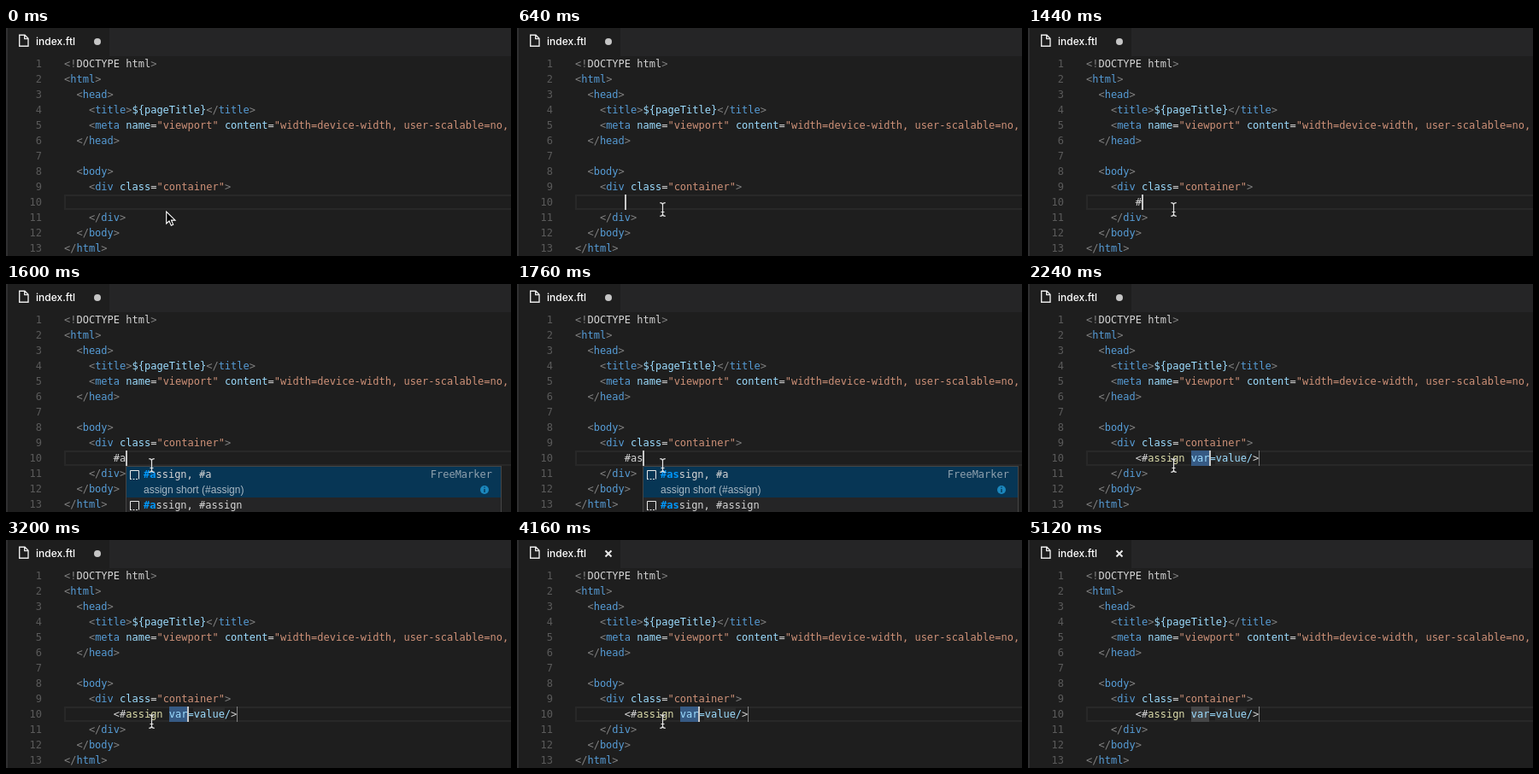
An HTML page for the animation above (5.28 s loop, 591 by 267 pixels).

```html
<!DOCTYPE html>
<html lang="en">
<head>
<meta charset="utf-8">
<title>Snippet completion</title>
<style>
html, body { margin: 0; width: 100%; height: 100%; overflow: hidden; background: #1e1e1e; }
svg { display: block; }
text { font: 12px "DejaVu Sans Mono", monospace; fill: #d4d4d4; white-space: pre; }
.num { fill: #5a5a5a; text-anchor: end; }
.punct { fill: #808080; }
.tag { fill: #569cd6; }
.attr { fill: #9cdcfe; }
.str { fill: #ce9178; }
.func { fill: #dcdcaa; }
.hit { fill: #0097fb; font-weight: bold; }
.tab { font: 500 12px Inter, sans-serif; fill: #fff; }
.note { font: 12px "Liberation Sans", Arial, sans-serif; fill: #a9b9c4; }
.origin { fill: #8fa1ae; text-anchor: end; }
.line { fill: none; stroke: #e8e8e8; }
</style>
</head>
<body>
<svg width="591" height="267" viewBox="0 0 591 267">
  <rect width="591" height="267" fill="#1e1e1e"/>
  <rect x="121" width="470" height="33" fill="#252526"/>
  <rect width="2" height="267" fill="#303031"/>
  <path class="line" stroke-width="1.4" d="M15.7 8.2H22L26 12.3V21.3H15.7ZM21.7 8.5V12.6H25.7"/>
  <text class="tab" x="35" y="20">index.ftl</text>
  <circle id="dirty" cx="107" cy="16" r="4" fill="#c5c5c5"/>
  <path id="close" class="line" stroke-width="2" d="M103.5 12.5l7 7m0-7l-7 7"/>

  <rect x="69" y="196" width="530" height="16" fill="none" stroke="#282828" stroke-width="2"/>
  <g id="fields">
    <rect id="selected" x="191" y="195" width="21" height="18"/>
    <rect x="219" y="195" width="37" height="18" fill="#2a2a2a"/>
    <rect x="270" y="195" width="1" height="18" fill="#808080"/>
  </g>
  <g id="code"></g>
  <text id="typed" x="125.8" y="208"></text>
  <rect id="caret" y="195" width="2" height="18" fill="#c8c8c8"/>

  <g id="widget">
    <rect x=".5" y="213.5" width="439" height="60" fill="#252526" stroke="#454545"/>
    <rect x="1" y="214" width="438" height="36" fill="#073655"/>
    <g id="rows"></g>
    <text class="origin" x="429" y="227">FreeMarker</text>
    <text class="note" x="21" y="245">assign short (#assign)</text>
    <circle cx="420" cy="241" r="5" fill="#1b87bd"/>
    <path d="M420 240v4M420 237.5v1.3" stroke="#073655" stroke-width="1.4"/>
  </g>

  <path id="arrow" d="M.7 1V15L4 12L6.3 17.3L8.7 16.2L6.4 11.1H11Z" fill="#000" stroke="#fff" stroke-width="1.1"/>
  <path id="beam" class="line" stroke-width="1.2" d="M.3 .7Q3.5 .7 3.5 3V14Q3.5 16.3 .3 16.3M6.7 .7Q3.5 .7 3.5 3M3.5 14Q3.5 16.3 6.7 16.3M1.5 11.5H5.5"/>
</svg>
<script>
const CHAR = 7.224, LOOP = 5280;
const $ = id => document.getElementById(id);
const esc = s => s.replace(/</g, '&lt;').replace(/>/g, '&gt;');
const span = (cls, s) => `<tspan class="${cls}">${esc(s)}</tspan>`;
const tag = (name, attrs = '') => span('punct', '<') + span('tag', name) + attrs + span('punct', '>');
const end = name => span('punct', '</') + span('tag', name) + span('punct', '>');
const attr = (name, value) => ' ' + span('attr', name) + '=' + span('str', `"${value}"`);

// Each line: indent in characters, content
const lines = [
  [0, span('punct', '<!') + 'DOCTYPE html' + span('punct', '>')],
  [0, tag('html')],
  [2, tag('head')],
  [4, tag('title') + span('attr', '${pageTitle}') + end('title')],
  [4, tag('meta', attr('name', 'viewport') + attr('content', 'width=device-width, user-scalable=no, '))],
  [2, end('head')],
  [0, ''],
  [2, tag('body')],
  [4, tag('div', attr('class', 'container'))],
  [0, ''],
  [4, end('div')],
  [2, end('body')],
  [0, end('html')]
];
$('code').innerHTML = lines.map(([indent, content], i) => {
  const y = 46 + 18 * i;
  return `<text class="num" x="42" y="${y}">${i + 1}</text>` +
    `<text x="${68 + indent * CHAR}" y="${y}">${content}</text>`;
}).join('');

const snippet = '&lt;#' + span('func', 'assign') + ' ' + span('attr', 'var=value/') + '&gt;';

const row = (y, word, rest, hits) =>
  `<path class="line" d="M5.5 ${y + 14}V${y + 4.5}H15.5V${y + 14}"/>` +
  `<path class="line" stroke-dasharray="2 1.5" d="M5 ${y + 14.5}H16"/>` +
  `<text x="21" y="${y + 13}">${span('hit', word.slice(0, hits))}${word.slice(hits)}${rest}</text>`;

// Value of the last step whose time has come
const at = (t, steps) => steps.filter(s => s[0] <= t).pop().slice(1);
const show = (id, on) => $(id).style.display = on ? '' : 'none';
const move = (id, x, y) => $(id).setAttribute('transform', `translate(${x} ${y})`);

const pointerSteps = [
  [0, 'arrow', 187, 214], [160, 'arrow', 139, 208], [320, 'arrow', 130, 200],
  [480, 'beam', 126, 194], [640, 'beam', 167, 204], [4640, 'beam', 321, 252], [4800, '']
];
const typedSteps = [[0, 0], [1440, 1], [1600, 2], [1760, 3], [1920, 5]];
const matchSteps = [[0, 2], [1760, 3], [1920, 4], [2080, 5]];
const caretSteps = [
  [0, false], [480, true], [960, false], [1440, true], [2720, false],
  [3200, true], [3680, false], [4160, true], [4640, false]
];

function draw(t) {
  const inserted = t >= 2240, saved = t >= 3680;
  const [count] = at(t, typedSteps), [hits] = at(t, matchSteps);

  show('dirty', !saved);
  show('close', saved);
  show('fields', inserted);
  $('selected').setAttribute('fill', t < 5120 ? '#365a84' : '#454647');
  $('typed').innerHTML = inserted ? snippet : '#assi'.slice(0, count);

  $('caret').setAttribute('x', Math.floor(126 + CHAR * (inserted ? 12 : count)));
  show('caret', at(t, caretSteps)[0]);

  show('widget', t >= 1600 && !inserted);
  move('widget', Math.floor(126 + CHAR * hits), 0);
  $('rows').innerHTML = row(214, '#assign', ', #a', hits) + row(250, '#assign', ', #assign', hits);

  const [kind, x, y] = at(t, pointerSteps);
  for (const id of ['arrow', 'beam']) show(id, id === kind);
  if (kind) move(kind, x, y);
}

const start = performance.now();
function tick() {
  draw((performance.now() - start) % LOOP);
  requestAnimationFrame(tick);
}
tick();
</script>
</body>
</html>
```
